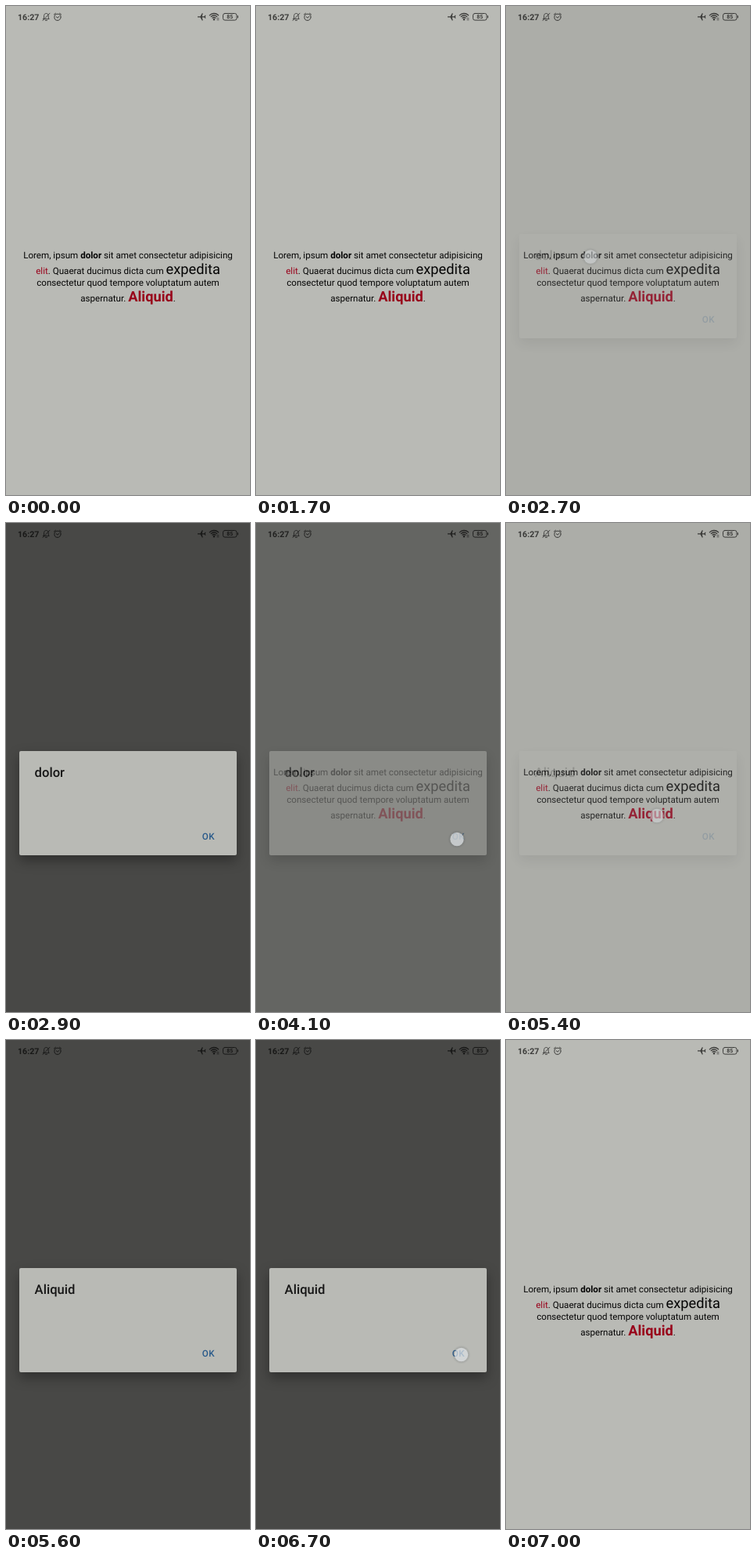
Write an HTML page with a canvas that moves like this. It is 312 px wide and 624 px high and loops after 7.8 s.

```html
<!DOCTYPE html>
<html lang="en">
<head>
<meta charset="utf-8">
<title>Tappable words</title>
<style>
  html, body { margin: 0; width: 100%; height: 100%; overflow: hidden; background: #b9bab5; }
  canvas { display: block; width: 312px; height: 624px; }
</style>
</head>
<body>
<canvas id="stage" width="312" height="624"></canvas>
<script>
const W = 312, H = 624, LOOP = 7800, STEP = 100;
const PAPER = '#b9bab5', INK = '#050505', RED = '#98001a', STATUS = '#3d3d3b';
const ctx = document.getElementById('stage').getContext('2d');
const layer = document.createElement('canvas');
layer.width = W;
layer.height = H;
const dialogCtx = layer.getContext('2d');
// Unhinted advances, as on a phone screen.
ctx.textRendering = dialogCtx.textRendering = 'geometricPrecision';

const font = (size, weight = 400) => `${weight} ${size}px Roboto, sans-serif`;
const BODY = font(11.62), BOLD = font(11.62, 700);
const LARGE = font(18.26), LARGE_BOLD = font(18.26, 700);

const paragraph = [
  { y: 322, runs: [['Lorem, ipsum '], ['dolor', BOLD], [' sit amet consectetur adipisicing']] },
  { y: 342, runs: [['elit', BODY, RED], ['. Quaerat ducimus dicta cum '], ['expedita', LARGE]] },
  { y: 357, runs: [['consectetur quod tempore voluptatum autem']] },
  { y: 377, runs: [['aspernatur. '], ['Aliquid', LARGE_BOLD, RED], ['.']] }
];

const dialogs = [
  { title: 'dolor', open: 2600, close: 4000 },
  { title: 'Aliquid', open: 5300, close: 7000, cut: true }
];

const touches = [
  { x: 108, y: 320, from: 2500, to: 2840 },
  { x: 257, y: 403.5, from: 3700, to: 4350 },
  { x: 193, y: 373.5, from: 5200, to: 5540 },
  { x: 262.5, y: 401.5, from: 6700, to: 7000, cut: true }
];

// Values at 100 ms intervals, linearly joined.
const FADE_IN = [0, 0.19, 0.8, 1], FADE_OUT = [1, 0.45, 0.1, 0];
const DIM_IN = [0, 0.07, 0.42, 0.61], DIM_OUT = [0.61, 0.46, 0.16, 0];

function sample(values, ms) {
  const p = Math.max(0, Math.min(values.length - 1, ms / 100));
  const i = Math.min(values.length - 2, Math.floor(p));
  return values[i] + (values[i + 1] - values[i]) * (p - i);
}

function level(d, t, rise, fall) {
  if (t < d.close) return sample(rise, t - d.open);
  return d.cut ? 0 : sample(fall, t - d.close);
}

function text(c, str, x, y, face, color) {
  c.font = face;
  c.fillStyle = color;
  c.fillText(str, x, y);
  return c.measureText(str).width;
}

function drawParagraph() {
  for (const { y, runs } of paragraph) {
    let width = 0;
    for (const [str, face = BODY] of runs) {
      ctx.font = face;
      width += ctx.measureText(str).width;
    }
    let x = (W - width) / 2;
    for (const [str, face = BODY, color = INK] of runs) x += text(ctx, str, x, y, face, color);
  }
}

function stroke(d, width = 1) {
  ctx.lineWidth = width;
  ctx.stroke(new Path2D(d));
}

function drawStatusBar() {
  text(ctx, '16:27', 15, 17.8, font(10.6, 700), STATUS);
  ctx.save();
  ctx.strokeStyle = ctx.fillStyle = STATUS;
  ctx.lineCap = ctx.lineJoin = 'round';

  // Muted bell
  stroke('M47.5 16.6H55.2L54.2 15V12.6C54.2 10.6 53 9.5 51.4 9.5S48.6 10.6 48.6 12.6V15ZM50.3 18.4H52.5M47 18.6L56 9.2', 0.9);

  // Alarm clock
  ctx.beginPath();
  ctx.arc(66, 14.3, 4.1, 0, Math.PI * 2);
  ctx.lineWidth = 1;
  ctx.stroke();
  stroke('M64.3 13.8L66 15.2L68 13.3M61.4 10.9L63.4 9.3M70.6 10.9L68.6 9.3');

  // Airplane, nose to the left
  ctx.fill(new Path2D('M245 13.2V14.4H248.5L250.7 18.4H251.8L250.7 14.4H253.5L254.6 15.8H255.5L254.9 13.8L255.5 11.8H254.6L253.5 13.2H250.7L251.8 9.2H250.7L248.5 13.2Z'));

  // Wi-Fi
  for (const r of [2.7, 5.2, 7.7]) {
    ctx.beginPath();
    ctx.arc(266, 17.2, r, -Math.PI * 0.76, -Math.PI * 0.24);
    ctx.lineWidth = 1.3;
    ctx.stroke();
  }
  ctx.beginPath();
  ctx.arc(266, 17.2, 1.2, 0, Math.PI * 2);
  ctx.fill();
  stroke('M270.2 15.2V18.2M271.8 15.2V18.2', 0.6);

  // Battery
  ctx.beginPath();
  ctx.roundRect(277.5, 9.5, 17.5, 8.6, 2.4);
  ctx.lineWidth = 1;
  ctx.stroke();
  ctx.fillRect(296, 12.3, 1, 3);
  ctx.textAlign = 'center';
  text(ctx, '85', 286.3, 16.3, font(6.9, 700), STATUS);
  ctx.restore();
}

function drawDialog(title, alpha) {
  const c = dialogCtx;
  c.clearRect(0, 0, W, H);
  c.save();
  c.shadowColor = 'rgba(0,0,0,.34)';
  c.shadowBlur = 16;
  c.shadowOffsetY = 7;
  c.fillStyle = PAPER;
  c.beginPath();
  c.roundRect(17, 291, 278, 133, 2);
  c.fill();
  c.restore();
  text(c, title, 36.6, 323.5, font(16.6, 500), '#161616');
  const okWidth = text(c, 'O', 250.7, 403.7, font(11.62, 500), '#28598a');
  text(c, 'K', 250.7 + okWidth + 0.6, 403.7, font(11.62, 500), '#28598a');
  ctx.globalAlpha = alpha;
  ctx.drawImage(layer, 0, 0);
  ctx.globalAlpha = 1;
}

function drawTouch({ x, y, from, to, cut }, t) {
  if (t < from || t >= to) return;
  ctx.globalAlpha = cut ? 1 : Math.min(1, (to - t) / 200);
  const halo = ctx.createRadialGradient(x, y, 8, x, y, 12);
  halo.addColorStop(0, 'rgba(70,75,80,.22)');
  halo.addColorStop(1, 'rgba(70,75,80,0)');
  ctx.fillStyle = halo;
  ctx.beginPath();
  ctx.arc(x, y, 12, 0, Math.PI * 2);
  ctx.fill();
  ctx.fillStyle = 'rgba(235,240,243,.66)';
  ctx.beginPath();
  ctx.arc(x, y, 8.7, 0, Math.PI * 2);
  ctx.fill();
  ctx.globalAlpha = 1;
}

function draw(t) {
  ctx.fillStyle = PAPER;
  ctx.fillRect(0, 0, W, H);
  drawStatusBar();
  drawParagraph();
  for (const d of dialogs) {
    const dim = level(d, t, DIM_IN, DIM_OUT);
    if (!dim) continue;
    ctx.fillStyle = `rgba(0,0,0,${dim})`;
    ctx.fillRect(0, 0, W, H);
    drawDialog(d.title, level(d, t, FADE_IN, FADE_OUT));
  }
  for (const touch of touches) drawTouch(touch, t);
}

const start = performance.now();
function frame() {
  const t = (performance.now() - start) % LOOP;
  draw(Math.floor(t / STEP) * STEP);
  requestAnimationFrame(frame);
}
frame();
</script>
</body>
</html>
```
